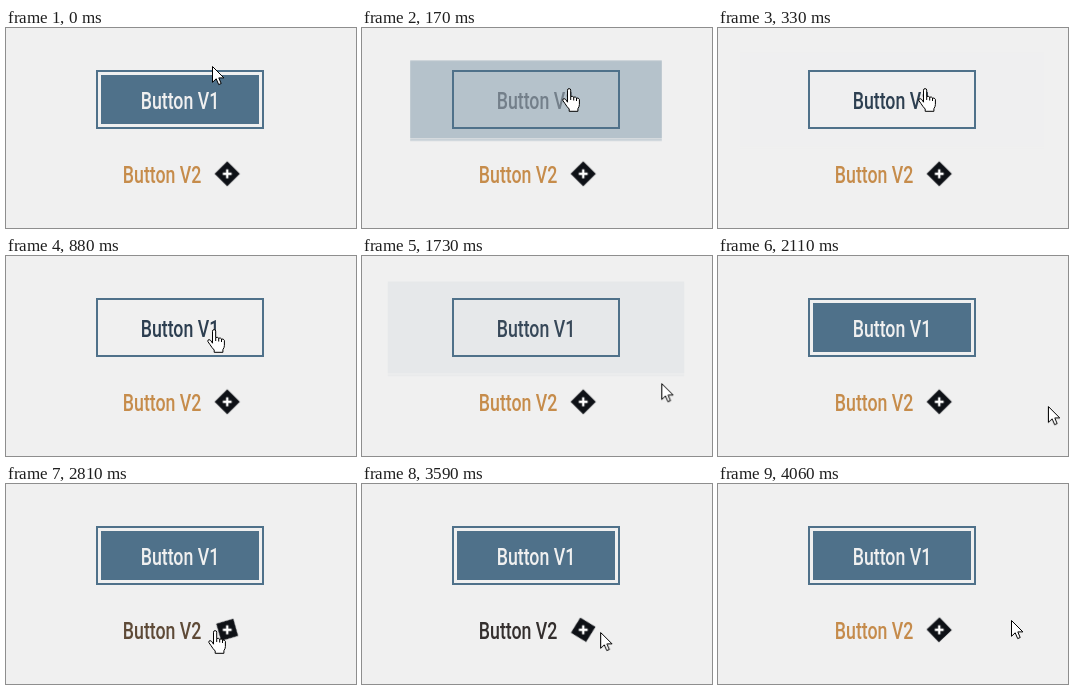
Animation of 350x200 px, one loop 4.14 s. Source, as an HTML page:

```html
<!DOCTYPE html>
<html lang="en">
<head>
<meta charset="utf-8">
<title>Button hover effects</title>
<style>
  :root {
    --loop: 4140ms linear infinite;
    --soft: cubic-bezier(.3, .3, .6, 1);
    --paper: #f0f0f0;
    --blue: #4f718a;
    --navy: #2c3e50;
    --gold: #c68c4b;
    --dark: #28282c;
  }
  html, body { margin: 0; width: 100%; height: 100%; overflow: hidden; background: var(--paper); }
  svg { display: block; width: 100vw; height: 100vh; }
  text { font: 500 24px Roboto, "Open Sans", sans-serif; }

  .fill { fill: var(--blue); transform-origin: 0 -.5px; animation: grow var(--loop), fade var(--loop); }
  .edge { animation: edge var(--loop); }
  .frame { fill: none; stroke: var(--blue); stroke-width: 2; }
  .label1 { animation: label1 var(--loop); }
  .label2 { animation: label2 var(--loop); }
  .icon { animation: spin var(--loop); }
  .cursor { fill: #fff; stroke: #000; stroke-linejoin: round; animation: move var(--loop); }
  .arrow { animation: arrow var(--loop); }
  .hand { animation: hand var(--loop); }

  /* first button: fill grows and fades on hover, returns on leave */
  @keyframes grow {
    0%, 48.53%, 100% { transform: scale(1); }
    1.45% { transform: scale(1); animation-timing-function: ease; }
    8.7% { transform: scale(1.93); }
    41.28% { transform: scale(1.93); animation-timing-function: ease; }
  }
  @keyframes fade {
    0%, 48.53%, 100% { opacity: 1; }
    1.45% { opacity: 1; animation-timing-function: var(--soft); }
    8.7% { opacity: 0; }
    41.28% { opacity: 0; animation-timing-function: ease; }
  }
  @keyframes edge {
    0%, 47%, 100% { opacity: 0; animation-timing-function: step-end; }
    1.9% { opacity: 1; animation-timing-function: step-end; }
  }
  @keyframes label1 {
    0%, 48.53%, 100% { fill: var(--paper); }
    1.45% { fill: var(--paper); animation-timing-function: var(--soft); }
    8.7% { fill: var(--navy); }
    41.28% { fill: var(--navy); animation-timing-function: ease; }
  }

  /* second button: text darkens, diamond makes half a turn */
  @keyframes label2 {
    0%, 99.76%, 100% { fill: var(--gold); }
    62.32% { fill: var(--gold); animation-timing-function: ease; }
    76.81% { fill: var(--dark); }
    85.51% { fill: var(--dark); animation-timing-function: ease; }
  }
  @keyframes spin {
    0%, 99.76%, 100% { transform: rotate(0deg); }
    62.32% { transform: rotate(0deg); animation-timing-function: ease; }
    76.81% { transform: rotate(180deg); }
    85.51% { transform: rotate(180deg); animation-timing-function: ease; }
  }

  @keyframes move {
    0%, 1.93% { transform: translate(206px, 38px); }
    2.17% { transform: translate(206px, 52px); }
    4.11%, 21.01% { transform: translate(206px, 60px); }
    21.26%, 22.95% { transform: translate(207px, 73px); }
    23.19%, 27.78% { transform: translate(207px, 85px); }
    39.86% { transform: translate(277px, 121px); }
    41.79% { transform: translate(299px, 127px); }
    43.72% { transform: translate(325px, 142px); }
    45.41%, 49.03% { transform: translate(337px, 152px); }
    50.97% { transform: translate(330px, 150px); }
    53.14% { transform: translate(319px, 158px); }
    54.59% { transform: translate(306px, 160px); }
    58.45% { transform: translate(270px, 158px); }
    62.32% { transform: translate(234px, 154px); }
    65.94% { transform: translate(209px, 148px); }
    67.87%, 84.78% { transform: translate(208px, 146px); }
    86.71% { transform: translate(238px, 148px); }
    98.07%, 100% { transform: translate(293px, 136px); }
  }
  @keyframes arrow {
    0%, 40.9%, 85.51%, 100% { opacity: 1; animation-timing-function: step-end; }
    2%, 62.2% { opacity: 0; animation-timing-function: step-end; }
  }
  @keyframes hand {
    0%, 40.9%, 85.51%, 100% { opacity: 0; animation-timing-function: step-end; }
    2%, 62.2% { opacity: 1; animation-timing-function: step-end; }
  }
</style>
</head>
<body>
<svg viewBox="0 0 350 200">
  <g transform="translate(174 72)">
    <g class="fill">
      <rect x="-79" y="-25" width="158" height="49"/>
      <rect class="edge" x="-79" y="24.6" width="158" height=".7"/>
    </g>
  </g>
  <rect class="frame" x="91" y="43" width="166" height="57"/>
  <text class="label1" transform="translate(134.7 81) scale(.74 1)">Button V1</text>

  <text class="label2" transform="translate(116.8 155) scale(.74 1)">Button V2</text>
  <g transform="translate(221.2 145.8)">
    <path class="icon" d="M0-12.6L12.6 0 0 12.6-12.6 0z" fill="#0e1116"/>
    <path d="M-4.4 0H4.4M0-4.4V4.4" stroke="#fff" stroke-width="2.4"/>
  </g>

  <g class="cursor">
    <path class="arrow" d="M.5.5V16.3L4.2 12.8 6.7 18.6 9.2 17.5 6.8 11.9H11.9z"/>
    <g class="hand" transform="translate(-6 0)">
      <path d="M5.5 14.2V2.2a1.6 1.6 0 0 1 3.2 0V8.6q1.6-1 3 .6 1.8-.8 2.8.8 2-.4 2.9 1.4v5.1q0 2-1.5 4.2V23.3H7.2V21Q4.8 18.6 3 15.6L.9 12.6q-.5-1.8 1.2-2 1.6 0 3.4 3.6z"/>
      <path d="M8.7 8.6V12M11.7 9.2v3.3M14.5 10v3"/>
    </g>
  </g>
</svg>
</body>
</html>
```
